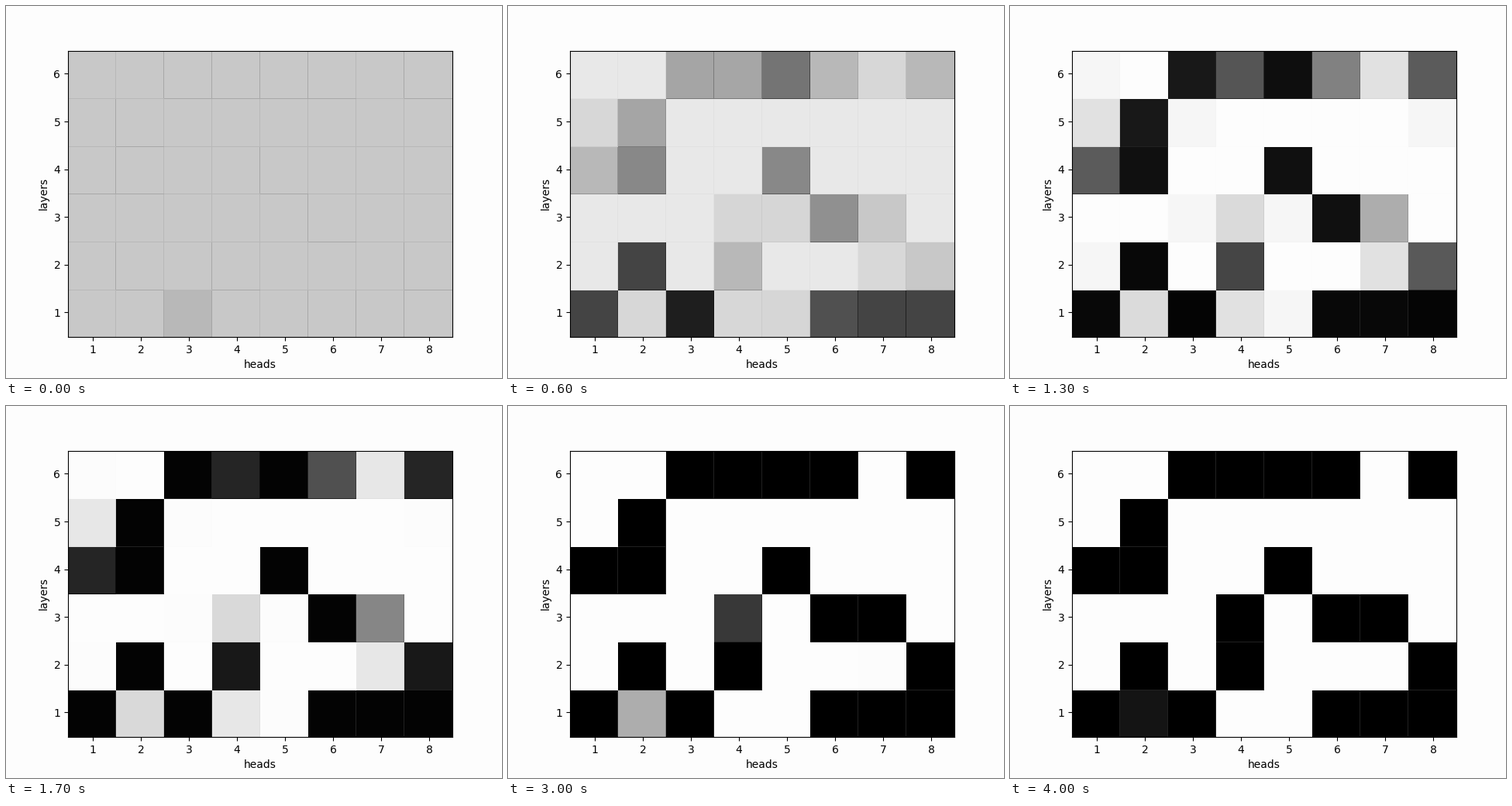
Animation of 640x480 px, one loop 4100 ms. Source, as a matplotlib script:

```python
import numpy as np
import matplotlib.pyplot as plt
from matplotlib.animation import FuncAnimation

FRAMES, INTERVAL = 41, 100
ROWS, COLS = 6, 8
CELL_W, CELL_H = 62, 61.6
WHITE, START = 253, 200

# One letter per cell, top layer first.
LAYOUT = ["uwacdexb", "xauwwwwu", "bfwwfwww",
          "wwugvrhw", "ukwiwwyj", "kmnxvpkq"]

# Grey level of each kind of cell at KEYS[1:]; the last one saturates.
KEYS = [0, 6, 10, 17, 25, 30, 40]
GREYS = {
    "w": [232, 252], "u": [232, 235, 252], "v": [214, 235, 252],
    "x": [215, 219, 231, 252], "y": [216, 219, 231, 235, 252],
    "a": [165, 88, 3], "b": [184, 146, 37, 2], "c": [166, 136, 37, 2],
    "d": [116, 44, 3], "e": [184, 166, 80, 2], "f": [136, 53, 3],
    "r": [144, 53, 3], "g": [214, 218, 217, 160, 56, 0],
    "h": [200, 197, 134, 2], "i": [184, 125, 24, 2], "j": [200, 166, 24, 2],
    "k": [68, 17, 3], "p": [80, 17, 3], "q": [68, 8, 3],
    "m": [215, 219, 217, 211, 173, 20], "n": [30, 6, 3],
}


def track(kind):
    """Grey level of one kind of cell over the loop, eased in logit space."""
    greys = GREYS[kind]
    end = 0 if greys[-1] < 128 else WHITE
    first = 184 if kind == "n" else START
    levels = [first] + greys + [end] * (len(KEYS) - 1 - len(greys))
    p = np.clip(np.array(levels) / 255, 0.002, WHITE / 255)
    logit = np.interp(np.arange(FRAMES), KEYS, np.log(p / (1 - p)))
    return 1 / (1 + np.exp(-logit))


TRACKS = {kind: track(kind) for kind in GREYS}
GATES = np.array([[TRACKS[k] for k in row] for row in LAYOUT])
EDGE = np.where(GATES[:, :, 17] < 0.4, 0.74, 0.37)


def seam(owner, strength):
    """Border of a cell: greys get a darker line, black a lighter one."""
    line = owner - strength * owner * (1 - owner)
    return np.where(owner < 0.1, np.maximum(line, 0.13), line)


def shade(i):
    """Cells with a seam on their right and lower side, bottom row first."""
    g = GATES[:, :, i]
    out = np.empty((2 * ROWS - 1, 2 * COLS - 1))
    out[::2, ::2] = g
    out[::2, 1::2] = seam(g[:, :-1], EDGE[:, 1:])
    out[1::2, ::2] = seam(g[:-1], EDGE[:-1])
    out[1::2, 1::2] = out[1::2, :-1:2]
    return out[::-1]


fig, ax = plt.subplots(figsize=(6.4, 4.8), dpi=100)
paper = (WHITE / 255,) * 3
fig.set_facecolor(paper)
ax.set_facecolor(paper)

# Mesh edges in pixels: wide cells with one-pixel seams.
width, height = COLS * CELL_W, ROWS * CELL_H
x_edges = [0] + [CELL_W * k + d for k in range(1, COLS) for d in (-1, 0)] + [width]
top, base = 57.6, 427.2
y_lines = [round(top + CELL_H * k) for k in range(ROWS - 1, 0, -1)]
y_edges = [0] + [base - y - d for y in y_lines for d in (1, 0)] + [height]

mesh = ax.pcolormesh(x_edges, y_edges, shade(0), cmap="gray", vmin=0, vmax=1)
ax.set_xlim(0, width)
ax.set_ylim(0, height)
# Ticks sit one pixel right of and above the cell centres.
ax.set_xticks(CELL_W * (np.arange(COLS) + 0.5) + 1, range(1, COLS + 1))
ax.set_yticks(CELL_H * (np.arange(ROWS) + 0.5) + 1, range(1, ROWS + 1))
ax.set_xlabel("heads")
ax.set_ylabel("layers")


def update(i):
    mesh.set_array(shade(i))
    return [mesh]


anim = FuncAnimation(fig, update, frames=FRAMES, interval=INTERVAL,
                     repeat=True, repeat_delay=0)
plt.show()
```
